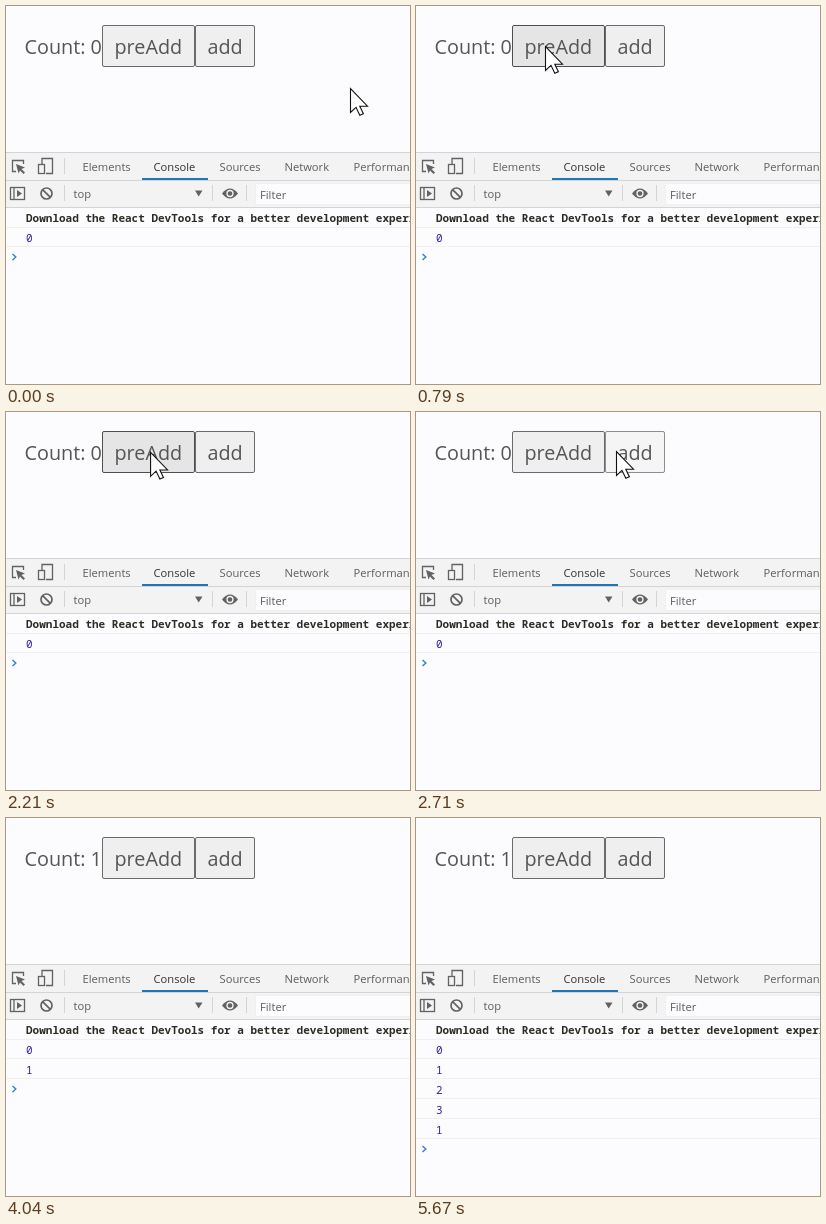
Animation, 404 px wide and 378 px high, one loop 6.18 s. Source, as an HTML page:

```html
<!DOCTYPE html>
<html lang="en">
<head>
<meta charset="utf-8">
<title>Delayed counter</title>
<style>
  html, body { margin: 0; width: 100%; height: 100%; overflow: hidden; background: #fcfcff; }
  svg { display: block; width: 404px; height: 378px; }
  text { font-family: "Open Sans", "Noto Sans", sans-serif; white-space: pre; }
  .page { font-size: 19.8px; fill: #555; }
  .ui { font-size: 11.2px; fill: #5c5c5c; }
  .mono { font: 11px "Noto Sans Mono", "DejaVu Sans Mono", monospace; fill: #2f23a5; }
  .notice { font-weight: 600; fill: #2c2c24; }
  .button { stroke: #6a6a6a; fill: #efefef; }
  .button.hover { stroke: #4f4f4f; fill: #e5e5e5; }
  .button.active { stroke: #8d8d8d; fill: #f5f5f5; }
  .bar { fill: #f3f3f3; }
  .edge { stroke: #d4d4d4; }
  .rule { stroke: #f0f0f0; }
  .icon { fill: none; stroke: #626262; stroke-width: 1.3; }
  .solid { fill: #626262; }
</style>
</head>
<body>
<svg viewBox="0 0 404 378">
  <rect width="404" height="378" fill="#fcfcff"/>
  <text id="count" class="page" x="18.5" y="48">Count: 0</text>
  <rect id="preAdd" class="button" x="96.5" y="19.5" width="92" height="41" rx="1.5"/>
  <rect id="add" class="button" x="189.5" y="19.5" width="59" height="41" rx="1.5"/>
  <text class="page" x="108.5" y="48">preAdd</text>
  <text class="page" x="201.5" y="48">add</text>

  <rect class="bar" y="146" width="404" height="55"/>
  <path class="edge" d="M0 146.5H404M0 174.5H404M0 201.5H404M58.5 152V168M58.5 179V195M206.5 179V195M240.5 179V195"/>
  <rect x="136" y="172" width="66" height="2" fill="#1f76b4"/>
  <g class="ui">
    <text x="76.5" y="165">Elements</text>
    <text x="147.5" y="165" fill="#333">Console</text>
    <text x="213.5" y="165">Sources</text>
    <text x="278.5" y="165">Network</text>
    <text x="347.5" y="165">Performance</text>
    <text x="67.5" y="192">top</text>
  </g>
  <rect x="249.5" y="177.5" width="160" height="21" fill="#fcfcff" stroke="#f0f0f0"/>
  <text class="ui" x="254" y="193">Filter</text>

  <g class="icon">
    <path d="M10 165.5H6.5V154.5H17.5V158"/>
    <path class="solid" stroke="none" d="M10 158L19 161.5L15.5 163L19 166.5L17.5 168L14 164.5L12.5 167.5Z"/>
    <path d="M36 158V152.5H46.5V167.5H40"/>
    <rect x="32.5" y="158.5" width="6" height="9"/>
    <rect x="4.5" y="181.5" width="14" height="12"/>
    <path d="M8 181.5V193.5"/>
    <path class="solid" stroke="none" d="M11 184L16 187.5L11 191Z"/>
    <circle cx="40.5" cy="187.5" r="5.5" stroke-width="1.7"/>
    <path d="M36.6 183.6L44.4 191.4" stroke-width="1.7"/>
    <path class="solid" stroke="none" d="M189 184.5H196.5L192.7 190.5Z"/>
    <path class="solid" stroke="none" d="M216 187.5Q224 177.5 232 187.5Q224 197.5 216 187.5Z"/>
    <circle cx="224" cy="187.5" r="3" fill="#626262" stroke="#f3f3f3"/>
  </g>

  <text class="mono notice" x="20" y="216">Download the React DevTools for a better development experience</text>
  <path class="rule" d="M0 221.5H404"/>
  <g id="log"></g>
  <path id="prompt" d="M6.5 -3L9.8 0L6.5 3" fill="none" stroke="#3a82d8" stroke-width="1.5"/>
  <path id="cursor" d="M0 0V24L5.5 18.8L9.3 26.8L12.9 25.2L9.3 17.7H17Z" fill="#fff" stroke="#111" stroke-width="1.1"/>
</svg>
<script>
  const LOOP = 6180, DELAY = 2500, PRESS = 90, LEAVE = 3060, EXIT = 3660;
  // time, x, y of the pointer tip
  const path = [
    [130, 344.5, 82.5], [690, 129.5, 40.5], [2110, 129.5, 40.5],
    [2450, 200.5, 39.5], [LEAVE, 200.5, 39.5], [3380, 99.5, 89.5], [EXIT, -6, 140]
  ];
  // a click counts when the button is released
  const clicks = [
    { time: 1530, button: "preAdd", value: 1 },
    { time: 1790, button: "preAdd", value: 2 },
    { time: 2040, button: "preAdd", value: 3 },
    { time: 2785, button: "add", value: 1 }
  ];
  const get = id => document.getElementById(id);
  const count = get("count"), log = get("log"), prompt = get("prompt"), cursor = get("cursor");
  const buttons = [
    { node: get("preAdd"), left: 96, right: 189 },
    { node: get("add"), left: 189, right: 249 }
  ];

  const rows = [0, ...clicks.map(c => c.value)].map((value, i) => {
    const row = document.createElementNS("http://www.w3.org/2000/svg", "g");
    const y = 236 + 20 * i;
    row.innerHTML = `<text class="mono" x="20" y="${y}">${value}</text>` +
      `<path class="rule" d="M0 ${y + 4.5}H404"/>`;
    return log.appendChild(row);
  });

  const smooth = p => p * p * (3 - 2 * p);
  const speedUp = p => p ** 1.5;

  function pointerAt(t) {
    if (t <= path[0][0]) return path[0].slice(1);
    const i = path.findIndex(key => key[0] > t);
    if (i < 0) return path[path.length - 1].slice(1);
    const [t0, x0, y0] = path[i - 1], [t1, x1, y1] = path[i];
    const linear = (t - t0) / (t1 - t0);
    const p = t0 > LEAVE ? linear : t0 === LEAVE ? speedUp(linear) : smooth(linear);
    return [x0 + (x1 - x0) * p, y0 + (y1 - y0) * p];
  }

  function render(t) {
    const [x, y] = pointerAt(t);
    cursor.setAttribute("transform", `translate(${x} ${y})`);
    cursor.style.display = t < EXIT ? "" : "none";

    for (const { node, left, right } of buttons) {
      const hover = x >= left && x < right && y >= 19 && y < 61;
      const active = clicks.some(c => c.button === node.id && t >= c.time - PRESS && t < c.time);
      node.classList.toggle("hover", hover);
      node.classList.toggle("active", active);
    }

    const done = clicks.filter(c => t >= c.time + DELAY);
    count.textContent = "Count: " + (done.length ? done[done.length - 1].value : 0);
    rows.forEach((row, i) => row.style.display = i <= done.length ? "" : "none");
    prompt.setAttribute("transform", `translate(0 ${251 + 20 * done.length})`);
  }

  const start = performance.now();
  function tick() {
    render((performance.now() - start) % LOOP);
    requestAnimationFrame(tick);
  }
  tick();
</script>
</body>
</html>
```
